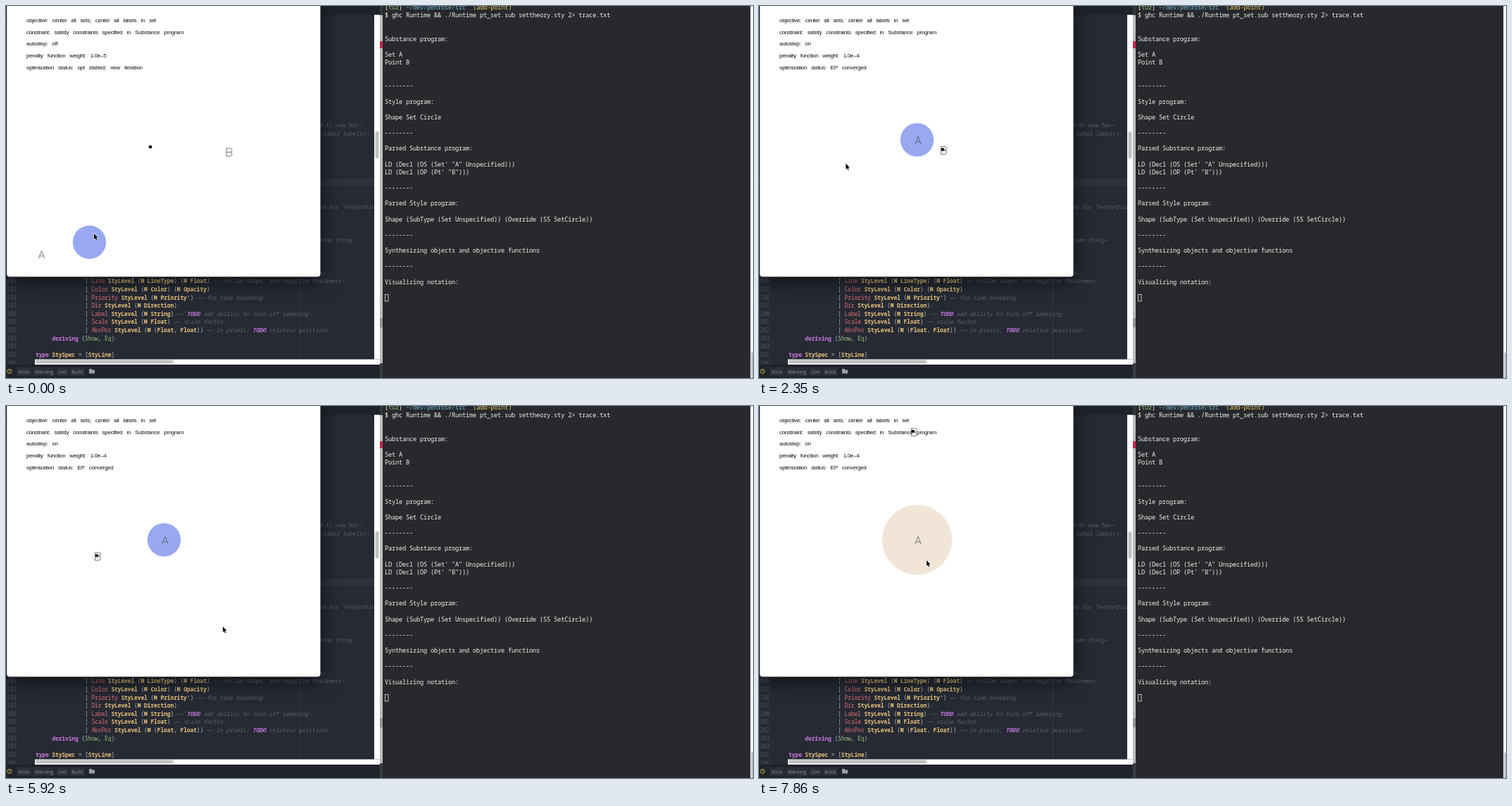
An HTML page with a canvas for the animation above (8 s loop, 1061 by 528 pixels).

```html
<!DOCTYPE html>
<html lang="en">
<head>
<meta charset="utf-8">
<title>Set and point layout</title>
<style>
html, body { margin: 0; width: 100%; height: 100%; overflow: hidden; background: #262a33; }
canvas { display: block; }
</style>
</head>
<body>
<canvas id="stage" width="1061" height="528"></canvas>
<script>
const W = 1061, H = 528, LOOP = 8000;
const STEP = 148.6, LEAD = 36, LAST_STEP = 53;
const MONO = '"Noto Sans Mono", monospace';
const ctx = document.getElementById('stage').getContext('2d');
const backdrop = document.createElement('canvas');
backdrop.width = W;
backdrop.height = H;

function box(c, x, y, w, h, color) {
  c.fillStyle = color;
  c.fillRect(x, y, w, h);
}

function write(c, text, x, y, color, font, spacing = 0) {
  c.font = font;
  c.letterSpacing = spacing + 'px';
  c.fillStyle = color;
  c.fillText(text, x, y);
}

// ---- Editor ----
const COL = 4.67, ROW = 11.65, CODE_TOP = 390.2;
const code = [
  "| Line StyLevel (M LineType) (M Float) —— hollow shape; non-negative thickness",
  "| Color StyLevel (M Color) (M Opacity)",
  "| Priority StyLevel (M Priority') —— for line breaking",
  "| Dir StyLevel (M Direction)",
  "| Label StyLevel (M String) —— TODO add ability to turn off labeling",
  "| Scale StyLevel (M Float) —— scale factor",
  "| AbsPos StyLevel (M (Float, Float)) —— in pixels; TODO relative positions",
  "deriving (Show, Eq)",
  "",
  "type StySpec = [StyLine]"
];

function editorText(c, text, x, y, color, style = '') {
  write(c, text, x, y + 3, color, `${style} 8.1px ${MONO}`, -0.19);
}

function tokenStyle(token, isConstructor) {
  if (/^(type|deriving)$/.test(token)) return ['#c678dd', 'bold'];
  if (/^(Show|Eq)$/.test(token)) return ['#98c379', ''];
  if (isConstructor) return ['#e06c75', '500'];
  if (/^\w/.test(token)) return ['#e5c07b', 'bold'];
  return ['#b4bac6', ''];
}

function codeLine(c, line, y) {
  const indent = { '|': 15, d: 5 }[line[0]] || 0;
  let col = indent;
  const put = (token, color, style) => {
    editorText(c, token, 42 + col * COL, y, color, style);
    col += token.length;
  };
  editorText(c, '·'.repeat(indent), 42, y, '#3d434e');
  const [head, comment = ''] = line.split(/(——.*)/);
  (head.match(/\w+'?|\W/g) || []).forEach((token, i) =>
    put(token, ...tokenStyle(token, head[0] === '|' && i === 2)));
  for (const part of comment.match(/TODO|(?:(?!TODO).)+/g) || [])
    part === 'TODO' ? put(part, '#c678dd', 'italic bold') : put(part, '#5c6370', 'italic');
  put('¬', '#3d434e', '');
}

function drawCode(c) {
  const peek = (rowsUp, text, x = 444) =>
    editorText(c, text, x, CODE_TOP - rowsUp * ROW, '#555c69', 'italic');
  c.save();
  c.beginPath();
  c.rect(0, 13, 523, 496);
  c.clip();
  peek(19, 'd A) now has¬');
  peek(18, 'label labels)¬', 450);
  peek(9, 'ed for "everything');
  peek(5, 'same thing¬');
  peek(1, 'd¬');
  code.forEach((line, i) => codeLine(c, line, CODE_TOP + i * ROW));
  for (let i = 0; i <= code.length; i++)
    editorText(c, String(196 + i), 1, CODE_TOP + i * ROW, '#4a5160');
  c.restore();
}

function drawStatusBar(c) {
  box(c, 0, 509, 531, 19, '#20242b');
  box(c, 0, 509, 531, 1, '#181b20');
  c.strokeStyle = '#d8bd4c';
  c.lineWidth = 0.9;
  c.beginPath();
  c.arc(5, 518.5, 3, 0, 7);
  c.moveTo(5, 516.7);
  c.lineTo(5, 519);
  c.stroke();
  let x = 18;
  for (const name of ['Error', 'Warning', 'Lint', 'Build']) {
    c.font = '6.6px "Open Sans", sans-serif';
    c.letterSpacing = '0px';
    const width = c.measureText(name).width;
    box(c, x - 3, 513, width + 6, 12, '#2a2f38');
    write(c, name, x, 521.5, '#8b93a1', c.font);
    x += width + 7.5;
  }
  box(c, 118, 515, 4, 2, '#9aa1ad');
  box(c, 118, 516.5, 8, 5, '#9aa1ad');
}

function drawEditor(c) {
  box(c, 0, 0, 531, H, '#262a33');
  box(c, 0, 0, 531, 13, '#1f2229');
  box(c, 0, 245, 523, 11, '#2c313b');
  box(c, 417, 13, 1, 488, '#323741');
  drawCode(c);
  box(c, 523, 12.5, 8, 489, '#fdfdfd');
  box(c, 41, 501.5, 490, 7.5, '#fdfdfd');
  c.fillStyle = '#c1c1c1';
  c.beginPath();
  c.roundRect(524.5, 178, 5, 38.5, 2.5);
  c.roundRect(42, 502.5, 196, 5, 2.5);
  c.fill();
  drawStatusBar(c);
}

// ---- Terminal ----
const terminal = `
$ ghc Runtime && ./Runtime pt_set.sub settheory.sty 2> trace.txt


Substance program:

Set A
Point B


--------

Style program:

Shape Set Circle

--------

Parsed Substance program:

LD (Decl (OS (Set' "A" Unspecified)))
LD (Decl (OP (Pt' "B")))

--------

Parsed Style program:

Shape (SubType (Set Unspecified)) (Override (SS SetCircle))

--------

Synthesizing objects and objective functions

--------

Visualizing notation:`.split('\n');

function drawTerminal(c) {
  box(c, 531, 0, 4, H, '#b9bbbd');
  box(c, 531, 0, 4, 13, '#33363b');
  box(c, 531, 50, 4, 10, '#c3294b');
  box(c, 531, 443, 4, 13, '#8f9296');
  box(c, 531, 507, 4, 21, '#3a3d42');
  box(c, 535, 0, 522.5, H, '#27292c');
  box(c, 1057.5, 0, 3.5, H, '#fdfdfd');
  box(c, 1058.5, 492, 2.5, 36, '#c1c1c1');
  const put = (text, col, row, color) =>
    write(c, text, 538 + col * 5.01, 5 + row * 11.13, color, `500 8.7px ${MONO}`, -0.21);
  put('[   ]', 0, 0, '#f0f0ec');
  put('tuz', 1, 0, '#8fc46a');
  put('~/dev/penrose/src', 6, 0, '#6fb5d3');
  put('(add-point)', 25, 0, '#ecd06c');
  terminal.forEach((line, row) => put(line, 0, row, '#f0f0ec'));
  c.strokeStyle = '#c4c4c0';
  c.lineWidth = 1;
  c.strokeRect(538.5, 409.5, 4.5, 9.5);
}

function windowPath(c) {
  c.beginPath();
  c.roundRect(1.2, -10, 445.3, 394.3, 4);
}

function drawBackdrop(c) {
  drawEditor(c);
  c.save();
  c.beginPath();
  c.rect(0, 0, 523, 501);
  c.clip();
  c.shadowColor = 'rgba(0,0,0,.6)';
  c.shadowBlur = 26;
  c.shadowOffsetY = 7;
  windowPath(c);
  c.fillStyle = '#fff';
  c.fill();
  c.restore();
  drawTerminal(c);
}

const AUTOSTEP = 3, JOIN = 4, SETTLE = 6;
const GRAB_A = 8, DROP_A = 12, SETTLE_A = 14;
const GRAB_DISC = 24, SNAP_DISC = 29;
const GRAB_B = 31, SNAP_B = 38;
const GREEN = 44, GREEN_DONE = 49, PEACH = 51, PEACH_DONE = 52;

const CENTER = [224.5, 190];
const add = ([x, y], dx, dy) => [x + dx, y + dy];
const mix = ([x0, y0], [x1, y1], k) => [x0 + (x1 - x0) * k, y0 + (y1 - y0) * k];

const stops = [
  [0, 125, 323], [1, 207, 277], [GRAB_A, 226, 192], [10, 156.5, 282.5], [11, 180.5, 226],
  [19, 89, 222], [22, 252, 205], [GRAB_DISC, 241, 191], [27, 412, 119],
  [SNAP_DISC, 259, 305], [GRAB_B, 262, 205], [34, 70, 366], [36, -3, 221],
  [SNAP_B, 30, 186], [40, 308, 313], [GREEN, 308.5, 308], [LAST_STEP, 238, 219]
];

function pointer(n) {
  const i = Math.max(1, stops.findIndex(stop => stop[0] >= n));
  const [n0, ...from] = stops[i - 1], [n1, ...to] = stops[i];
  return mix(from, to, (n - n0) / (n1 - n0));
}

const discStart = [118.5, 335.3], aStart = [50.5, 353];
const dotStart = [205, 200], bStart = [317, 207.5];
const firstMeet = mix(dotStart, bStart, 0.5);
const secondMeet = mix(firstMeet, pointer(36), 0.5);

function disc(n) {
  if (n < JOIN) return discStart;
  if (n < SETTLE) return mix(discStart, CENTER, (n - AUTOSTEP) / (SETTLE - AUTOSTEP));
  if (n > GRAB_DISC && n < SNAP_DISC) return add(pointer(n), -16.5, -1.5);
  return n >= GREEN && n < GREEN_DONE ? [368.3, 204.8] : CENTER;
}

// Dragged labels trail the pointer by one step
function labelA(n) {
  if (n < JOIN) return aStart;
  if (n > GRAB_A && n < DROP_A) return pointer(n - 1);
  if (n > GRAB_DISC && n < SNAP_DISC) return add(CENTER, 1.5, 1);
  const home = add(disc(n), 1.5, 1);
  if (n >= DROP_A && n < SETTLE_A)
    return mix(pointer(10), home, (n - DROP_A + 1) / (SETTLE_A - DROP_A + 1));
  return home;
}

function dot(n) {
  if (n < JOIN) return dotStart;
  if (n < SNAP_B) return firstMeet;
  if (n < GREEN) return secondMeet;
  return n < PEACH ? [87.2, 168] : [218.6, 36];
}

function labelB(n) {
  if (n < JOIN) return bStart;
  if (n > GRAB_B && n < SNAP_B) return pointer(n - 1);
  return add(dot(n), 1.5, 1.2);
}

function status(n) {
  if (n < JOIN) return ['1.0e–5', 'opt started; new iteration'];
  const between = (a, b) => n >= a && n < b;
  const running = between(JOIN, SETTLE) || between(DROP_A, SETTLE_A) ||
    between(GREEN, GREEN_DONE) || between(PEACH, PEACH_DONE);
  return running ? ['1.0e–5', 'unconstrained running'] : ['1.0e–4', 'EP converged'];
}

function discLook(n) {
  if (n < GREEN) return [23.7, '#98a8f1'];
  return n < PEACH ? [48.3, '#cee8b6'] : [49.5, '#f1e5d7'];
}

// ---- Diagram ----
function polyline(points, [x, y]) {
  points.forEach(([px, py], i) => ctx[i ? 'lineTo' : 'moveTo'](x + px, y + py));
}

function strokeLabel(at, selected, shapes) {
  ctx.strokeStyle = selected ? '#f52a22' : '#555';
  ctx.lineWidth = 0.8;
  ctx.beginPath();
  for (const points of shapes) polyline(points, at);
  ctx.stroke();
}

const glyphA = [[[-4.4, 5.5], [0, -5.5], [4.4, 5.5]], [[-2.8, 1.9], [2.8, 1.9]]];
const bowl = side => [[1.5, 0], [3.5, side], [4, 2.8 * side], [3.5, 4.6 * side], [1.5, 5.5 * side]];
const glyphB = [[[-4, 0], ...bowl(-1), [-4, -5.5], [-4, 5.5], ...bowl(1).reverse()]];

function drawPointer(at) {
  ctx.beginPath();
  polyline([[0, 0], [0, 8], [1.8, 6.4], [3, 9.4], [4.3, 8.8], [3.1, 6], [5.4, 5.8]], at);
  ctx.closePath();
  ctx.lineJoin = 'round';
  ctx.lineWidth = 1.2;
  ctx.strokeStyle = '#fff';
  ctx.stroke();
  ctx.fillStyle = '#000';
  ctx.fill();
  ctx.lineJoin = 'miter';
}

function drawInfo(n) {
  const [weight, state] = status(n);
  const lines = [
    'objective: center all sets; center all labels in set',
    'constraint: satisfy constraints specified in Substance program',
    'autostep: ' + (n < AUTOSTEP ? 'off' : 'on'),
    'penalty function weight: ' + weight,
    'optimization status: ' + state
  ];
  ctx.wordSpacing = '4.1px';
  lines.forEach((line, i) =>
    write(ctx, line, 29, 22.8 + i * 16.7, '#111', '8px "Liberation Sans", Arial, sans-serif', -0.3));
  ctx.wordSpacing = '0px';
}

function draw(n) {
  ctx.drawImage(backdrop, 0, 0);
  ctx.save();
  windowPath(ctx);
  ctx.clip();
  drawInfo(n);

  const [radius, color] = discLook(n);
  ctx.globalAlpha = n > GRAB_DISC && n < SNAP_DISC ? 0.5 : 1;
  ctx.fillStyle = color;
  ctx.beginPath();
  ctx.arc(...disc(n), radius, 0, 7);
  ctx.fill();
  ctx.globalAlpha = 1;

  ctx.fillStyle = '#000';
  ctx.beginPath();
  ctx.ellipse(...dot(n), 2.5, 2.2, 0, 0, 7);
  ctx.fill();
  strokeLabel(labelA(n), n >= GRAB_A && n < DROP_A, glyphA);
  strokeLabel(labelB(n), n >= GRAB_B && n < SNAP_B, glyphB);
  drawPointer(pointer(n));
  ctx.restore();
}

drawBackdrop(backdrop.getContext('2d'));

// The recording stood still for these spans of steps
const pauses = [[1, 3], [27, 29], [40, 44], [45, 49]];

function stepAt(t) {
  const n = Math.min(LAST_STEP, Math.floor((t + LEAD) / STEP));
  const pause = pauses.find(([from, to]) => n > from && n < to);
  return pause ? pause[0] : n;
}

const start = performance.now();
function frame() {
  draw(stepAt((performance.now() - start) % LOOP));
  requestAnimationFrame(frame);
}
frame();
</script>
</body>
</html>
```
